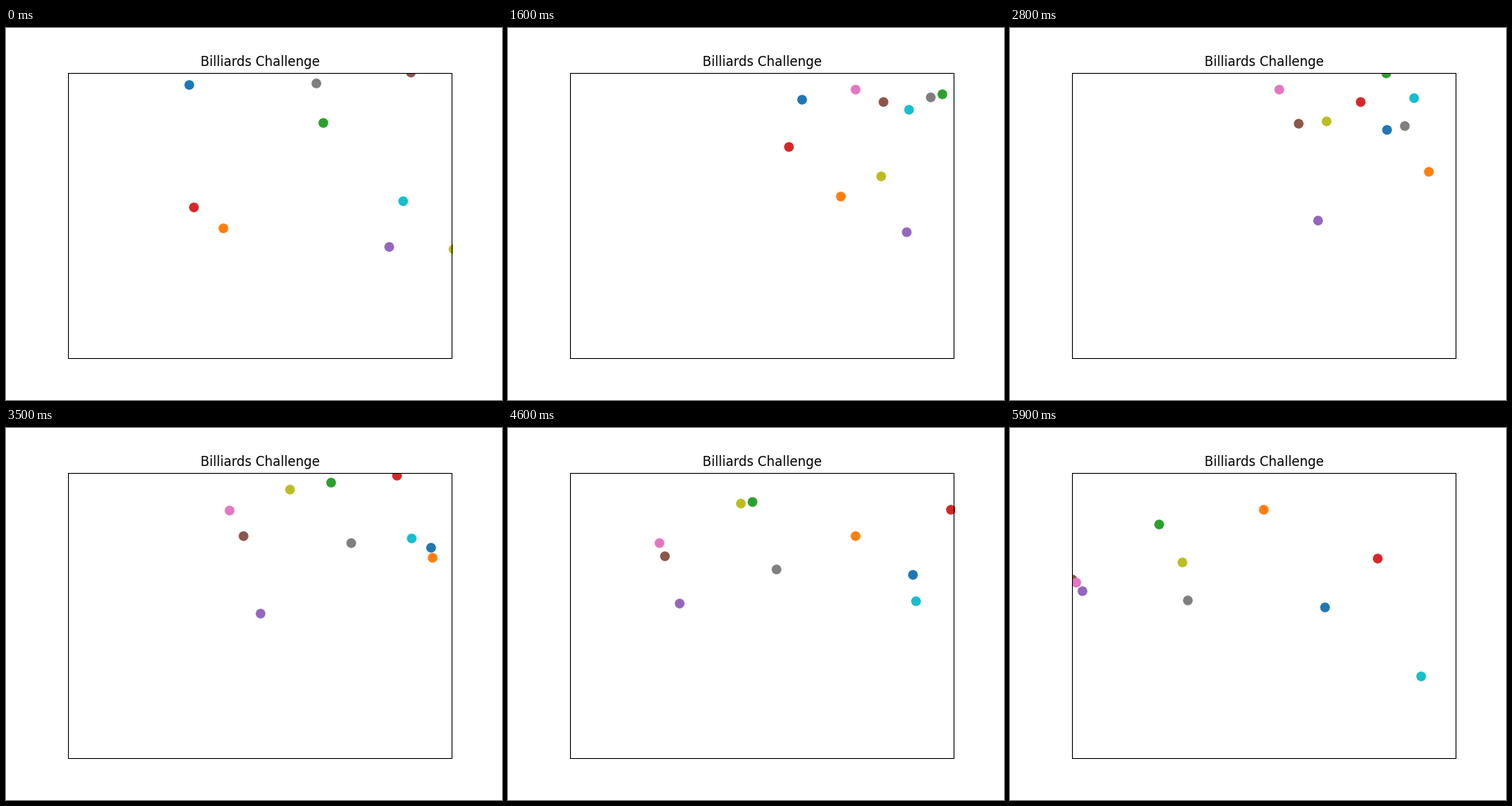
A matplotlib script that plays this animation: 640x480 px, repeating every 6000 ms.

```python
import numpy as np
import matplotlib.pyplot as plt
from matplotlib.animation import FuncAnimation

FRAMES = 60
INTERVAL = 100
SPEED = 0.02

# Start on the unit table (x, y) and heading in degrees; all share one speed
BALLS = np.array([
    (0.2968, 0.9498, 25.96),
    (0.3851, 0.4506, 20.53),
    (0.6447, 0.8202, 17.90),
    (0.3117, 0.5177, 41.04),
    (0.8159, 0.3886, 9.54),
    (0.8724, 0.9948, 18.45),
    (0.9983, 0.7647, 31.58),
    (0.6278, 0.9565, 24.66),
    (0.9896, 0.3688, 52.68),
    (0.8704, 0.5312, 88.24),
])


def roll(balls):
    """Positions per frame; a ball turns back once it has crossed an edge."""
    pos = balls[:, :2].copy()
    heading = np.radians(balls[:, 2])
    vel = SPEED * np.column_stack([np.cos(heading), np.sin(heading)])
    path = []
    for _ in range(FRAMES):
        pos = pos + vel
        vel = np.where((pos < 0) | (pos > 1), -vel, vel)
        path.append(pos)
    return path


path = roll(BALLS)

fig, ax = plt.subplots(figsize=(6.4, 4.8), dpi=100)
ax.set_xlim(0, 1)
ax.set_ylim(0, 1)
ax.axis("off")
ax.set_title("Billiards Challenge")

dots = [ax.plot([], [], "o", color=f"C{i}", ms=8)[0] for i in range(len(BALLS))]
# Cushion, half of its width clipped by the axes
ax.plot([0, 1, 1, 0, 0], [0, 0, 1, 1, 0], color="black", lw=1.5)


def update(frame):
    for dot, (x, y) in zip(dots, path[frame]):
        dot.set_data([x], [y])
    return dots


anim = FuncAnimation(fig, update, frames=FRAMES, interval=INTERVAL,
                     repeat=True, repeat_delay=0)
plt.show()
```
